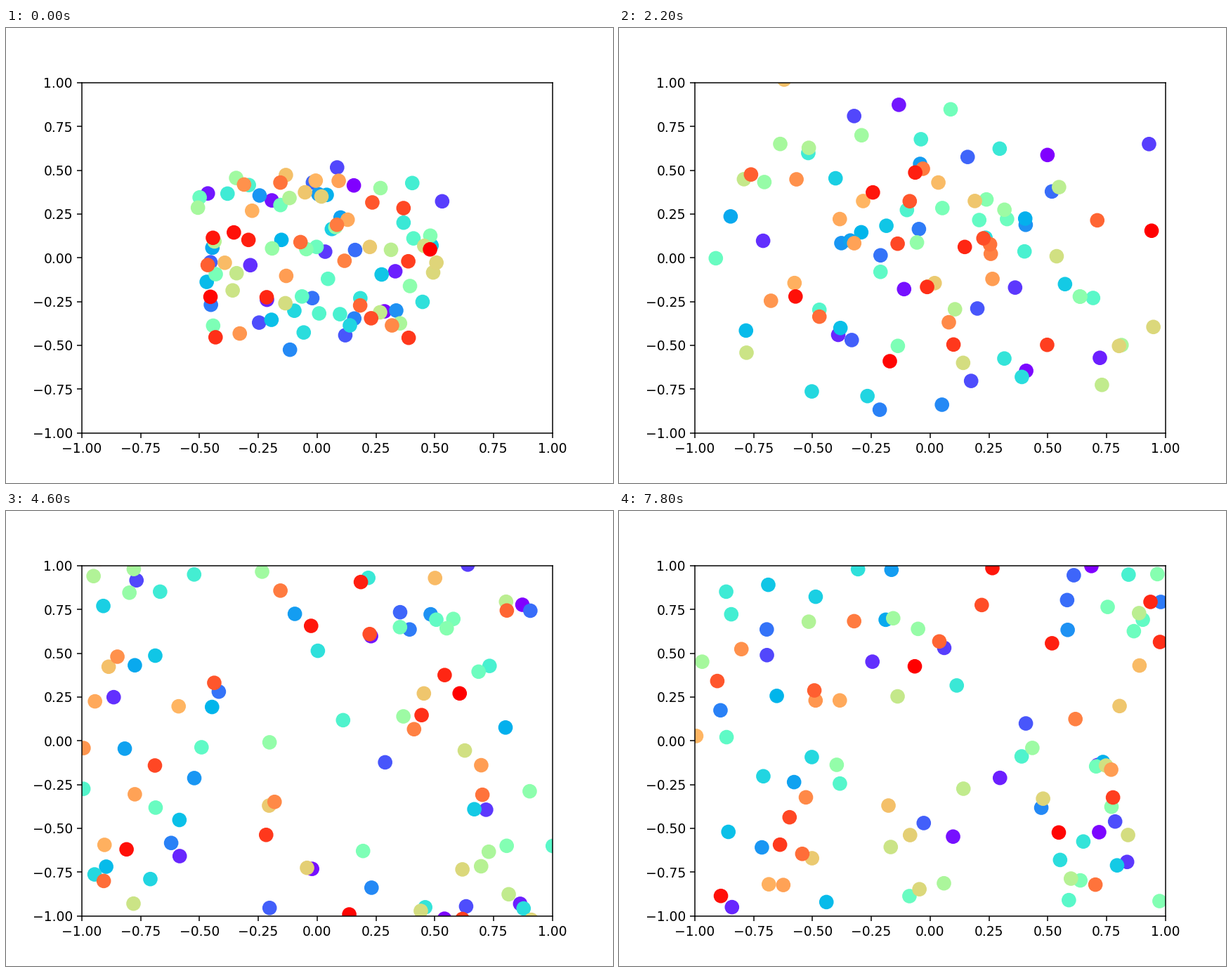
A matplotlib script that plays this animation: 864 by 648 pixels, repeating every 8 s.

```python
import numpy as np
import matplotlib.pyplot as plt
from matplotlib.animation import FuncAnimation

COUNT, FRAMES, INTERVAL = 100, 40, 200
SPREAD, MAX_SPEED = 0.5, 0.05          # axis units, axis units per frame


def simulate():
    """Positions of all dots in every frame: straight paths between walls."""
    rng = np.random.default_rng(7)
    pos = rng.uniform(-SPREAD, SPREAD, (COUNT, 2))
    vel = rng.uniform(-MAX_SPEED, MAX_SPEED, (COUNT, 2))
    path = []
    for _ in range(FRAMES):
        pos = pos + vel
        vel[np.abs(pos) > 1] *= -1     # turn back after crossing a wall
        path.append(pos)
    return path


path = simulate()

fig, ax = plt.subplots(figsize=(6.4, 4.8), dpi=135)
ax.set(xlim=(-1, 1), ylim=(-1, 1))
colors = plt.cm.rainbow(np.linspace(0, 1, COUNT))
dots = ax.scatter(*path[0].T, s=100, c=colors, linewidths=1)


def update(i):
    dots.set_offsets(path[i])
    return (dots,)


anim = FuncAnimation(fig, update, frames=FRAMES, interval=INTERVAL,
                     repeat=True, repeat_delay=0)
plt.show()
```
